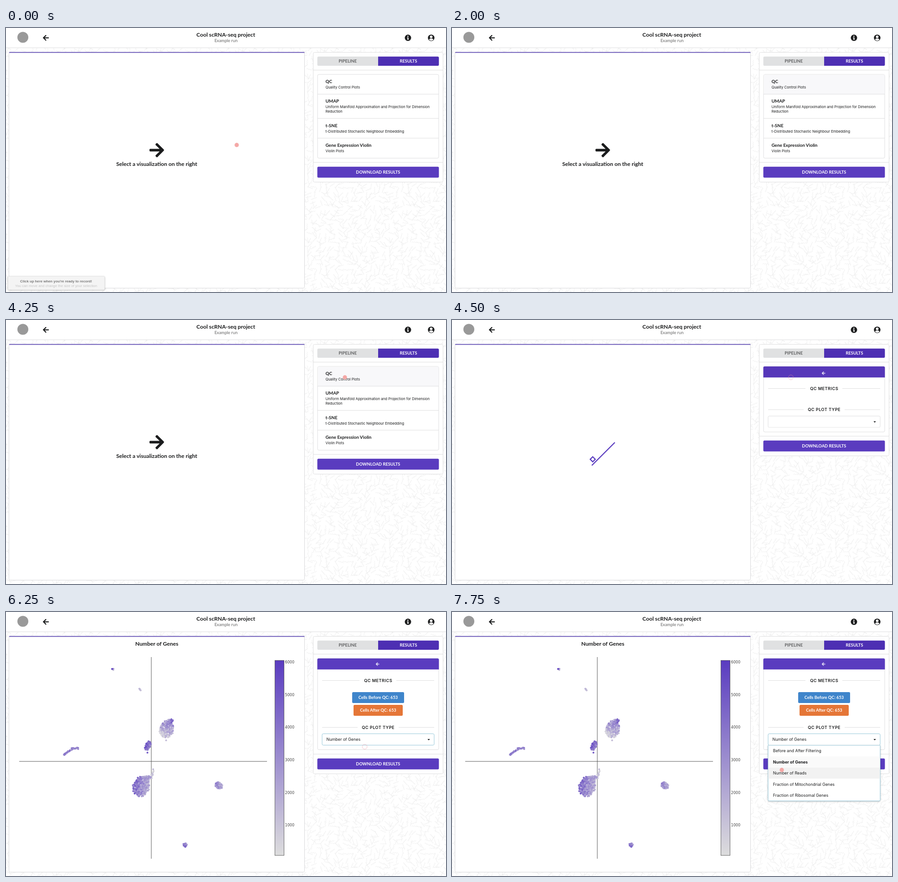
An HTML page for the animation above (8000 ms loop, 966 by 580 pixels).

```html
<!DOCTYPE html>
<html lang="en">
<head>
<meta charset="utf-8">
<title>Single-cell results</title>
<style>
html, body { margin: 0; width: 100%; height: 100%; overflow: hidden; background: #fff; }
svg { display: block; width: 966px; height: 580px; font: 700 9.3px Lato, sans-serif; fill: #1b1c1d; }
.mid { text-anchor: middle; }
.big { font-size: 12.15px; }
.head { font-size: 9.9px; }
.desc { font: 400 7.83px Inter, sans-serif; }
.form { font: 400 8.95px Inter, sans-serif; }
.rule { font: 600 9.1px Inter, sans-serif; letter-spacing: .5px; text-anchor: middle; }
.tick { font: 400 8.04px "DejaVu Sans", sans-serif; fill: #444; }
.tip { font: 700 7.8px "Liberation Sans", Arial, sans-serif; text-anchor: middle; }
.white { fill: #fff; }
.purple { fill: #5a3cbf; }
.line { stroke: #dededf; fill: none; }
.box { fill: #fff; stroke: #dededf; }

/* one slot of 250 ms is 3.125% */
.anim { animation: var(--k) 8s step-end infinite; }
@keyframes tip { 0% { opacity: 1 } 3.125%, to { opacity: 0 } }
@keyframes home { 0% { opacity: 1 } 56.25%, to { opacity: 0 } }
@keyframes hover { 0% { opacity: 0 } 18.75% { opacity: 1 } 34.375% { opacity: 0 } 43.75% { opacity: 1 } 56.25%, to { opacity: 0 } }
@keyframes detail { 0% { opacity: 0 } 56.25%, to { opacity: 1 } }
@keyframes load { 0% { opacity: 0 } 56.25% { opacity: 1 } 59.375%, to { opacity: 0 } }
@keyframes loaded { 0% { opacity: 0 } 59.375%, to { opacity: 1 } }
@keyframes back { 0% { opacity: 0 } 59.375% { opacity: 1 } 62.5%, to { opacity: 0 } }
@keyframes arrow { 0% { opacity: 1; transform: translateY(2.5px) } 59.375% { opacity: 0 } 62.5%, to { opacity: 1; transform: none } }
@keyframes bar { 0% { fill: #5637b9 } 59.375% { fill: #4f31b2 } 62.5%, to { fill: #5a3cbf } }
@keyframes card { 0% { height: 285px } 56.25% { height: 245px } 59.375%, to { height: 302px } }
@keyframes inner { 0% { height: 184px } 56.25% { height: 144px } 59.375%, to { height: 200.5px } }
@keyframes foot { 0% { transform: none } 56.25% { transform: translateY(-40px) } 59.375%, to { transform: translateY(17px) } }
@keyframes select { 0% { transform: translateY(-56.5px) } 59.375%, to { transform: none } }
@keyframes focus { 0% { stroke: #dededf } 78.125%, to { stroke: #96c8da } }
@keyframes menu { 0% { opacity: 0 } 81.25%, to { opacity: 1 } }
@keyframes row { 0% { transform: translateY(-49px) } 90.625% { transform: translateY(-24.5px) } 93.75%, to { transform: none } }
@keyframes move {
  0% { transform: translate(506.5px, 257px) }
  9.375% { transform: translate(530px, 245px) }
  12.5% { transform: translate(597px, 203px) }
  15.625% { transform: translate(675px, 150px) }
  18.75% { transform: translate(735px, 118px) }
  21.875% { transform: translate(757px, 111px) }
  34.375% { transform: translate(690px, 109px) }
  37.5% { transform: translate(671px, 109px) }
  40.625% { transform: translate(670.5px, 109px) }
  43.75% { transform: translate(690px, 112px) }
  46.875% { transform: translate(722px, 119px) }
  50% { transform: translate(741px, 125px) }
  53.125% { transform: translate(744px, 126px) }
  62.5% { transform: translate(752px, 160px) }
  65.625% { transform: translate(775px, 235px) }
  68.75% { transform: translate(786px, 283px) }
  71.875% { transform: translate(788px, 292px) }
  75% { transform: translate(787.5px, 296px) }
  84.375% { transform: translate(786px, 299px) }
  87.5% { transform: translate(776px, 310px) }
  90.625% { transform: translate(752px, 330px) }
  93.75% { transform: translate(730px, 343px) }
  96.875%, to { transform: translate(724px, 347px) }
}
@keyframes dot {
  0% { opacity: 1 } 25% { opacity: 0 } 34.375% { opacity: 1 } 56.25% { opacity: 0 }
  62.5% { opacity: 1 } 78.125% { opacity: 0 } 81.25%, to { opacity: 1 }
}
@keyframes ring {
  0% { opacity: 0 } 56.25% { opacity: 1 } 62.5% { opacity: 0 } 78.125% { opacity: 1 } 81.25%, to { opacity: 0 }
}
</style>
</head>
<body>
<svg viewBox="0 0 966 580">
  <defs>
    <pattern id="squiggles" width="180" height="180" patternUnits="userSpaceOnUse">
      <path id="wiggle" fill="none" stroke="#ebebeb" stroke-width=".8" stroke-linejoin="round"/>
    </pattern>
    <linearGradient id="scale" x2="0" y2="1">
      <stop stop-color="#5a3cc0"/><stop offset="1" stop-color="#ddd"/>
    </linearGradient>
    <filter id="soft" x="-10%" y="-30%" width="120%" height="170%">
      <feDropShadow dx="0" dy="1" stdDeviation="1.6" flood-opacity=".3"/>
    </filter>
    <!-- right arrow, 32 wide, centred on the origin -->
    <path id="arrow" d="M-2.4-13.5l1.6-1.6q1.2-1 2.4 0L15.500-1.200q1 1.200 0 2.400L1.600 15.100q-1.200 1-2.400 0l-1.600-1.600q-1-1.200 0-2.400L6.200 2.900H-14.300q-1.700 0-1.700-1.700V-1.200q0-1.700 1.700-1.700H6.200L-2.400-11.100q-1-1.200 0-2.400z"/>
  </defs>

  <rect width="966" height="580" fill="#fff"/>
  <rect y="43" width="966" height="537" fill="url(#squiggles)"/>

  <!-- top bar -->
  <rect width="966" height="43" fill="#fff"/>
  <path class="line" d="M0 43.5H966"/>
  <circle cx="37" cy="20.5" r="12" fill="#999"/>
  <use href="#arrow" transform="translate(87.5 21.6) scale(-.41 .41)"/>
  <text class="mid big" x="482.5" y="18.8">Cool scRNA-seq project</text>
  <text class="mid" x="483" y="31" style="font-weight:400" fill="#666">Example run</text>
  <circle cx="882.5" cy="21.6" r="7"/>
  <path fill="#fff" d="M881.2 17.1h2.3v2.2h-2.3zM880.5 20.4h3v3.8h1v1.4h-4v-1.4h1v-2.4h-1z"/>
  <circle cx="933.5" cy="21.6" r="7.2"/>
  <circle class="white" cx="933.5" cy="19.3" r="2.9"/>
  <path class="white" d="M928.7 25.5q1.4-2.6 3-2.6h3.6q1.6 0 3 2.6a6 6 0 0 1-9.6 0z"/>

  <!-- main panel -->
  <rect x="6.5" y="53.5" width="649" height="518" rx="3" fill="#fff" stroke="#d8d8da"/>
  <path d="M6.5 54.4q0-1.6 2-1.6H653.5q2.3 0 2.3 1.6z" fill="#5f4bb2"/>

  <g class="anim" style="--k:home">
    <use href="#arrow" x="331" y="268.3"/>
    <text class="mid big" x="330.8" y="303">Select a visualization on the right</text>
  </g>
  <g class="anim" style="--k:load" fill="none" stroke="#5a3cbf" stroke-width="2.4">
    <path d="M307 319.5L357.5 269"/>
    <path d="M309 300.5L314.5 306L309 311.5L303.5 306z"/>
  </g>
  <g class="anim" style="--k:loaded">
    <text class="mid big" x="331" y="73.5">Number of Genes</text>
    <path d="M29 328.2H573M319 99V542" stroke="#444" stroke-width=".9"/>
    <g id="cells"></g>
    <rect x="590.3" y="106.3" width="20" height="428.5" fill="url(#scale)" stroke="#444" stroke-width=".8"/>
    <g id="ticks" class="tick"></g>
  </g>

  <!-- side card -->
  <rect class="box anim" style="--k:card" x="674.5" y="53.5" width="285" height="285" rx="3"/>
  <path d="M686 62.8H817V83H686q-2.500 0-2.500-2.500v-15.200q0-2.500 2.500-2.500z" fill="#e0e1e2"/>
  <path d="M817 62.8H948q2.400 0 2.400 2.500v15.200q0 2.500-2.400 2.500H817z" fill="#4d2fb3"/>
  <text class="mid" x="750.2" y="76.300" fill="#5f6061">PIPELINE</text>
  <text class="mid white" x="883.5" y="76.300">RESULTS</text>
  <path class="line" d="M674 92.5H960"/>
  <rect class="box anim" style="--k:inner" x="684" y="102" width="266" height="184" rx="3"/>

  <g class="anim" style="--k:home">
    <rect class="anim" style="--k:hover" x="684.5" y="102.5" width="265" height="42.5" fill="#f8f8fa"/>
    <path class="line" d="M684 145.3H950M684 198.5H950M684 242H950"/>
    <g class="head">
      <text x="701.5" y="121">QC</text>
      <text x="701.5" y="164">UMAP</text>
      <text x="701.5" y="217.5">t-SNE</text>
      <text x="701.5" y="261">Gene Expression Violin</text>
    </g>
    <g class="desc">
      <text x="701.5" y="132.8">Quality Control Plots</text>
      <text x="701.5" y="176">Uniform Manifold Approximation and Projection for Dimension</text>
      <text x="701.5" y="186.3">Reduction</text>
      <text x="701.5" y="229.5">t-Distributed Stochastic Neighbour Embedding</text>
      <text x="701.5" y="273">Violin Plots</text>
    </g>
  </g>

  <g class="anim" style="--k:foot">
    <path class="line" d="M674 295.2H960"/>
    <rect class="purple" x="683.5" y="304.7" width="266.9" height="24" rx="2.5"/>
    <text class="mid white" x="816.9" y="320.2">DOWNLOAD RESULTS</text>
  </g>

  <g class="anim" style="--k:detail">
    <path class="anim" style="--k:bar" d="M683.5 126.3V104.500q0-2.500 2.500-2.500H948q2.400 0 2.400 2.500V126.300z"/>
    <g class="anim" style="--k:arrow">
      <use href="#arrow" class="white" transform="translate(815.8 114.4) scale(-.24 .24)"/>
    </g>
    <text class="mid white anim" style="--k:back" x="817" y="117.6">Click to go back</text>
    <path class="line" d="M694 150.5H776M857 150.5H940"/>
    <text class="rule" x="817.2" y="153.7">QC METRICS</text>
    <g class="anim" style="--k:loaded">
      <rect x="760" y="176" width="114" height="24" rx="2.5" fill="#3f85cb"/>
      <text class="mid white" x="817" y="191.2">Cells Before QC: 653</text>
      <rect x="763" y="204" width="108" height="24" rx="2.5" fill="#e57637"/>
      <text class="mid white" x="817" y="219.4">Cells After QC: 653</text>
    </g>
    <g class="anim" style="--k:select">
      <path class="line" d="M694 253.5H772M862 253.5H940"/>
      <text class="rule" x="817.2" y="256.7">QC PLOT TYPE</text>
      <rect class="box anim" style="--k:focus" x="694" y="267.5" width="246" height="25" rx="2.5"/>
      <path d="M925.4 279h5.4l-2.7 3z"/>
      <text class="form anim" style="--k:loaded" x="703.5" y="283.3">Number of Genes</text>
    </g>
  </g>

  <g class="anim form" style="--k:menu">
    <path d="M694 293V412.5q0 2.5 2.5 2.5H937.5q2.5 0 2.5-2.5V293z" fill="#fff" stroke="#96c8da" filter="url(#soft)"/>
    <path d="M694.5 293H939.5" stroke="#e4eef2"/>
    <rect x="694.5" y="317.3" width="245" height="24.5" fill="#fafafa"/>
    <rect class="anim" style="--k:row" x="694.5" y="341.8" width="245" height="24.4" fill="#f2f2f2"/>
    <text x="704.8" y="308.2">Before and After Filtering</text>
    <text x="704.8" y="332.7" style="font-weight:700">Number of Genes</text>
    <text x="704.8" y="357.2">Number of Reads</text>
    <text x="704.8" y="381.7">Fraction of Mitochondrial Genes</text>
    <text x="704.8" y="406.2">Fraction of Ribosomal Genes</text>
  </g>

  <g class="anim tip" style="--k:tip">
    <rect x="4.5" y="545.5" width="212" height="29.5" rx="2" fill="#f4f4f4" stroke="#dcdcdc" stroke-width=".6" filter="url(#soft)"/>
    <text x="110" y="558.5" fill="#777">Click up here when you're ready to record!</text>
    <text x="110" y="568.5" fill="#c4c4c4" style="font-weight:400">You can move and change the size of your selection</text>
  </g>

  <g class="anim" style="--k:move">
    <circle class="anim" style="--k:dot" r="4.7" fill="#f4a8a6"/>
    <circle class="anim" style="--k:ring" r="5.3" fill="none" stroke="#e98c9c" stroke-width=".8" stroke-opacity=".65"/>
  </g>
</svg>
<script>
const byId = id => document.getElementById(id);
let seed = 7;
const rand = () => (seed = (seed * 16807) % 2147483647) / 2147483647;
const jitter = size => (rand() - .5) * 2 * size;

// Background: short zigzags in random directions, repeated across tile edges.
function squiggles(tile, cell) {
  let d = "";
  for (let gy = 0; gy < tile; gy += cell) {
    for (let gx = 0; gx < tile; gx += cell) {
      const x = gx + jitter(2), y = gy + jitter(2), angle = rand() * Math.PI;
      let steps = "";
      for (let i = 0; i < 6; i++) {
        const a = angle + (i % 2 ? .7 : -.7);
        steps += `l${(2.8 * Math.cos(a)).toFixed(1)} ${(2.8 * Math.sin(a)).toFixed(1)}`;
      }
      for (const dx of [0, -tile, tile])
        for (const dy of [0, -tile]) d += `M${(x + dx).toFixed(1)} ${(y + dy).toFixed(1)}${steps}`;
    }
  }
  return d;
}
byId("wiggle").setAttribute("d", squiggles(180, 10));

const dots = [];
function dot(x, y, value) {
  const v = Math.max(.04, Math.min(1, value));
  const color = `rgb(${[221 - 131 * v, 221 - 161 * v, 221 - 29 * v].map(Math.round)})`;
  dots.push(`<circle cx="${x.toFixed(1)}" cy="${y.toFixed(1)}" r="2.1" fill="${color}"/>`);
}

// Evenly filled ellipse; tone takes offsets from -1 to 1.
function blob(cx, cy, rx, ry, count, skew, tone) {
  for (let i = 0; i < count; i++) {
    const r = Math.sqrt((i + .5) / count), a = i * 2.39996;
    const u = r * Math.cos(a) + jitter(.07), v = r * Math.sin(a) + jitter(.07);
    dot(cx + rx * u - skew * v, cy + ry * v, tone(u, v) + jitter(.16));
  }
}
function strand(points, each, spread, tone) {
  for (let i = 0; i + 1 < points.length; i++) {
    const [x, y] = points[i], [x2, y2] = points[i + 1];
    for (let k = 0; k < each; k++) {
      const p = k / each;
      dot(x + (x2 - x) * p + jitter(spread), y + (y2 - y) * p + jitter(spread), tone + jitter(.15));
    }
  }
}

strand([[318, 366], [321, 356], [324, 345]], 6, 1.6, .1);
blob(297, 383, 18, 22, 190, 3, u => .5 - .22 * u);
blob(311, 364, 7, 5, 14, 0, () => .38);
blob(352.5, 258, 15, 19, 120, 2, (u, v) => .32 + .1 * u - .2 * v);
blob(361, 239, 6, 4, 14, 0, u => .6 + .25 * u);
dot(351.5, 282, .2);
blob(311.5, 294, 6, 10, 50, 3, u => .68 - .15 * u);
dot(310.5, 309, .8);
strand([[127, 314], [133, 310], [140, 305], [146, 300], [153, 299], [160, 300]], 7, 1.4, .55);
blob(467, 381, 8, 7.5, 38, -1.5, u => .4 - .16 * u);
blob(393, 512, 4, 4.5, 14, 0, (u, v) => .55 + .15 * v);
strand([[292.5, 168.8], [296.5, 173]], 5, .4, .3);
dot(235.5, 127.5, .2);
dot(235.8, 124.8, .4);
dot(233, 125.2, .95);
byId("cells").innerHTML = dots.join("");

byId("ticks").innerHTML = [6, 5, 4, 3, 2, 1]
  .map((n, i) => `<text x="612.6" y="${113.2 + 71.6 * i}">${n}000</text>`).join("");
</script>
</body>
</html>
```
